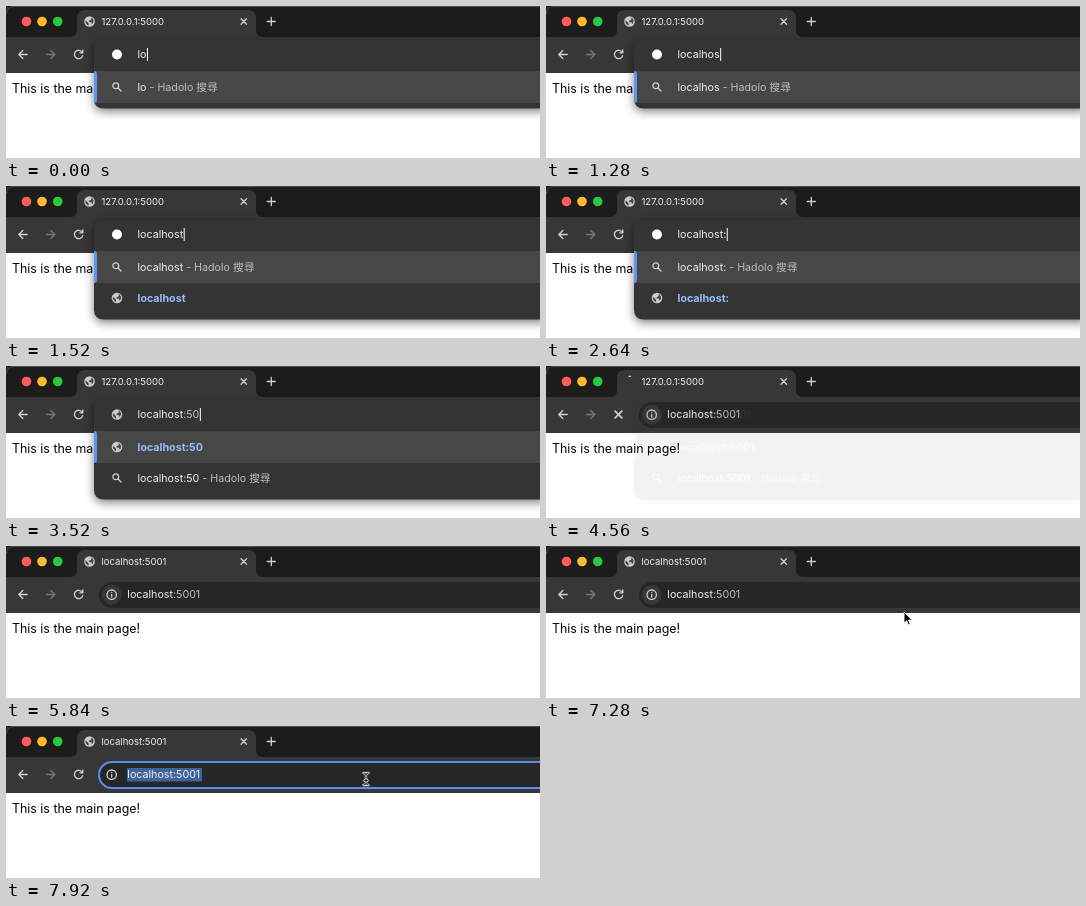
An HTML page for the animation above (8000 ms loop, 534 by 152 pixels).

```html
<!DOCTYPE html>
<html lang="zh-Hant">
<head>
<meta charset="utf-8">
<style>
html, body { margin: 0; width: 100%; height: 100%; overflow: hidden; background: #fff; }
svg { display: block; width: 534px; height: 152px; }
text { font: 10.7px Inter, "Noto Sans CJK TC", "Noto Sans CJK", sans-serif; fill: #f0f0f0; white-space: pre; }
.dim { fill: #bdbdbd; }
.url { fill: #99bdf9; font-weight: 700; }
.line { fill: none; stroke: #d0d0d0; stroke-width: 1.3; stroke-linecap: round; stroke-linejoin: round; }
#popup { filter: drop-shadow(0 3px 5px rgba(0, 0, 0, .5)); }
</style>
</head>
<body>
<svg viewBox="0 0 534 152">
  <defs>
    <g id="globe">
      <circle r="5.3" fill="#c9cbce"/>
      <path d="M-4.2-1.2-1 1.6-.8 4.2Q-4.4 3-4.2-1.2ZM0-4.2 1.9-3.6 1.7-1.8-.2-.9-.6.6 2 .8 2.6 2.9Q4.5 1 4-1.5L2.6-3.4Z" fill="#45474a"/>
    </g>
    <g id="lens" class="line"><circle cx="-1.2" cy="-1.2" r="2.9"/><path d="M1 1 4 4"/></g>
    <path id="cross" class="line" d="M-2.7-2.7 2.7 2.7M2.7-2.7-2.7 2.7"/>
  </defs>

  <text x="6" y="86.5" style="font-size:12.4px;fill:#000">This is the main page!</text>

  <rect width="534" height="67" fill="#1c1c1c"/>
  <path d="M0 31H64Q71 31 71 24V12Q71 4 79 4H242Q250 4 250 12V24Q250 31 257 31H534V67H0Z" fill="#373737"/>
  <path d="M.5 8Q.5.5 8 .5H534" fill="none" stroke="#4c4c4c"/>
  <circle cx="20.5" cy="15.5" r="4.8" fill="#ff5f57"/>
  <circle cx="36" cy="15.5" r="4.8" fill="#febc2e"/>
  <circle cx="51.7" cy="15.5" r="4.8" fill="#28c840"/>
  <use id="favicon" href="#globe" x="83.5" y="15.5"/>
  <path id="spinner" class="line" d="M83 10.3H84.6" stroke-width="1"/>
  <text id="title" x="95.5" y="19" style="font-size:9.5px"></text>
  <use href="#cross" x="237.8" y="15.5"/>
  <path class="line" d="M261.3 15.5H269.3M265.3 11.5V19.5"/>
  <path class="line" d="M21.2 48.5H12.8M16.8 44.5 12.8 48.5 16.8 52.5"/>
  <path class="line" d="M40.4 48.5H48.8M44.8 44.5 48.8 48.5 44.8 52.5" style="stroke:#777"/>
  <path id="reload" class="line" d="M76.2 46.2A4.2 4.2 0 1 0 76.7 49.6M76.8 43.8V46.8H73.8"/>
  <use id="stop" href="#cross" transform="translate(72.5 48.5) scale(1.25)"/>

  <g id="bar">
    <rect id="pill" x="93" y="36" width="470" height="26" rx="13" fill="#262626"/>
    <circle cx="105.7" cy="48.7" r="10" fill="#373737" id="chip"/>
    <g class="line" stroke-width="1.1"><circle cx="105.7" cy="48.7" r="4.7"/><path d="M105.7 48.4V51M105.7 46.3V46.4"/></g>
    <rect id="selection" x="121" y="42" width="75" height="13.5" fill="#3f639b"/>
    <text x="121.3" y="52.3">localhost<tspan id="port" class="dim">:5001</tspan></text>
  </g>

  <g id="popup">
    <path id="panel" fill="#343434"/>
    <rect x="88" y="65" width="446" height="32" fill="#474747"/>
    <path d="M88 65Q91 65 91 68V94Q91 97 88 97Z" fill="#8ab4f8" style="fill:#5f94f0"/>
    <circle id="engine" cx="111" cy="48.5" r="5" fill="#fff"/>
    <use id="site" href="#globe" x="111" y="48.5"/>
    <text id="typed" x="131.5" y="52.3"><tspan id="host"></tspan><tspan id="rest"></tspan></text>
    <rect id="caret" y="42" width="1" height="13" fill="#fff"/>
    <g id="search"><use href="#lens" x="111" y="81"/><text x="131.5" y="84.8"><tspan id="query"></tspan><tspan class="dim"> - Hadolo 搜尋</tspan></text></g>
    <g id="visit"><use href="#globe" x="111" y="81"/><text id="address" class="url" x="131.5" y="84.8"></text></g>
  </g>

  <path id="arrow" d="M0 0V11.2L2.6 8.8 4.4 12.9 6.2 12.1 4.5 8.1H8Z" fill="#000" stroke="#fff" stroke-width=".9"/>
  <g id="beam" fill="none" stroke-linecap="round">
    <path d="M-2.4-6Q0-6 0-4.4Q0-6 2.4-6M0-4.4V4.4M-2.4 6Q0 6 0 4.4Q0 6 2.4 6M-1.4 1.5H1.4" stroke="#fff" stroke-width="2.4"/>
    <path d="M-2.4-6Q0-6 0-4.4Q0-6 2.4-6M0-4.4V4.4M-2.4 6Q0 6 0 4.4Q0 6 2.4 6M-1.4 1.5H1.4" stroke="#111"/>
  </g>
</svg>
<script>
const $ = id => document.getElementById(id);
const show = (id, on) => $(id).style.display = on ? '' : 'none';
const move = (id, x, y) => $(id).setAttribute('transform', `translate(${x} ${y})`);

const ADDRESS = 'localhost:5001';
// time of each keystroke, starting with two letters typed
const keys = [0, 80, 320, 480, 1040, 1120, 1280, 1360, 1680, 3200, 3440, 3600, 3920];
// pointer: time, x, y
const trail = [[7120, 500, 83], [7200, 408, 73], [7280, 358, 66], [7360, 356, 60], [7520, 360, 53]];

function pointer(t) {
  const i = trail.findIndex(p => p[0] > t);
  if (i < 0) return trail.at(-1).slice(1);
  const [a, b] = [trail[Math.max(i - 1, 0)], trail[i]];
  const k = Math.max(0, (t - a[0]) / (b[0] - a[0]));
  return [a[1] + (b[1] - a[1]) * k, a[2] + (b[2] - a[2]) * k];
}

function drawPopup(t) {
  const count = keys.filter(k => k <= t).length;
  const text = ADDRESS.slice(0, count + 1);
  const swapped = t >= 3280, tall = t >= 1440;
  const bottom = tall ? 133.5 : 102.5;
  $('panel').setAttribute('d',
    `M540 34H97Q88 34 88 43V${bottom - 10}Q88 ${bottom} 98 ${bottom}H540Z`);
  $('host').textContent = swapped ? text.slice(0, 9) : text;
  $('rest').textContent = swapped ? text.slice(9) : '';
  $('rest').setAttribute('class', 'dim');
  $('query').textContent = $('address').textContent = text;
  show('engine', !swapped);
  show('site', swapped);
  show('visit', tall);
  move('search', 0, swapped ? 31 : 0);
  move('visit', 0, swapped ? 0 : 31);
  show('caret', (t - keys[count - 1]) % 960 < 480);
  $('caret').setAttribute('x', 132 + $('typed').getComputedTextLength());
}

function draw(t) {
  const opened = t >= 4560, loading = opened && t < 4880;
  const focused = t >= 7680;
  show('popup', t < 4720);
  if (t < 4720) drawPopup(t);
  $('popup').style.opacity = opened ? .06 : 1;
  show('bar', opened);
  show('favicon', !loading);
  show('spinner', loading);
  show('stop', loading);
  show('reload', !loading);
  $('title').textContent = t < 4720 ? '127.0.0.1:5000' : ADDRESS;

  $('pill').setAttribute('stroke', focused ? '#5b8def' : 'none');
  $('pill').setAttribute('stroke-width', 2);
  show('chip', !focused);
  show('selection', t >= 7760);
  $('port').setAttribute('class', t >= 7760 ? '' : 'dim');

  const [x, y] = pointer(t), inBar = y < 62;
  show('arrow', t >= 7120 && !inBar);
  show('beam', t >= 7120 && inBar);
  move('arrow', x, y);
  move('beam', x, y);
}

function frame(now) {
  const t = now % 8000;
  draw(t - t % 80);
  requestAnimationFrame(frame);
}
draw(0);
requestAnimationFrame(frame);
</script>
</body>
</html>
```
